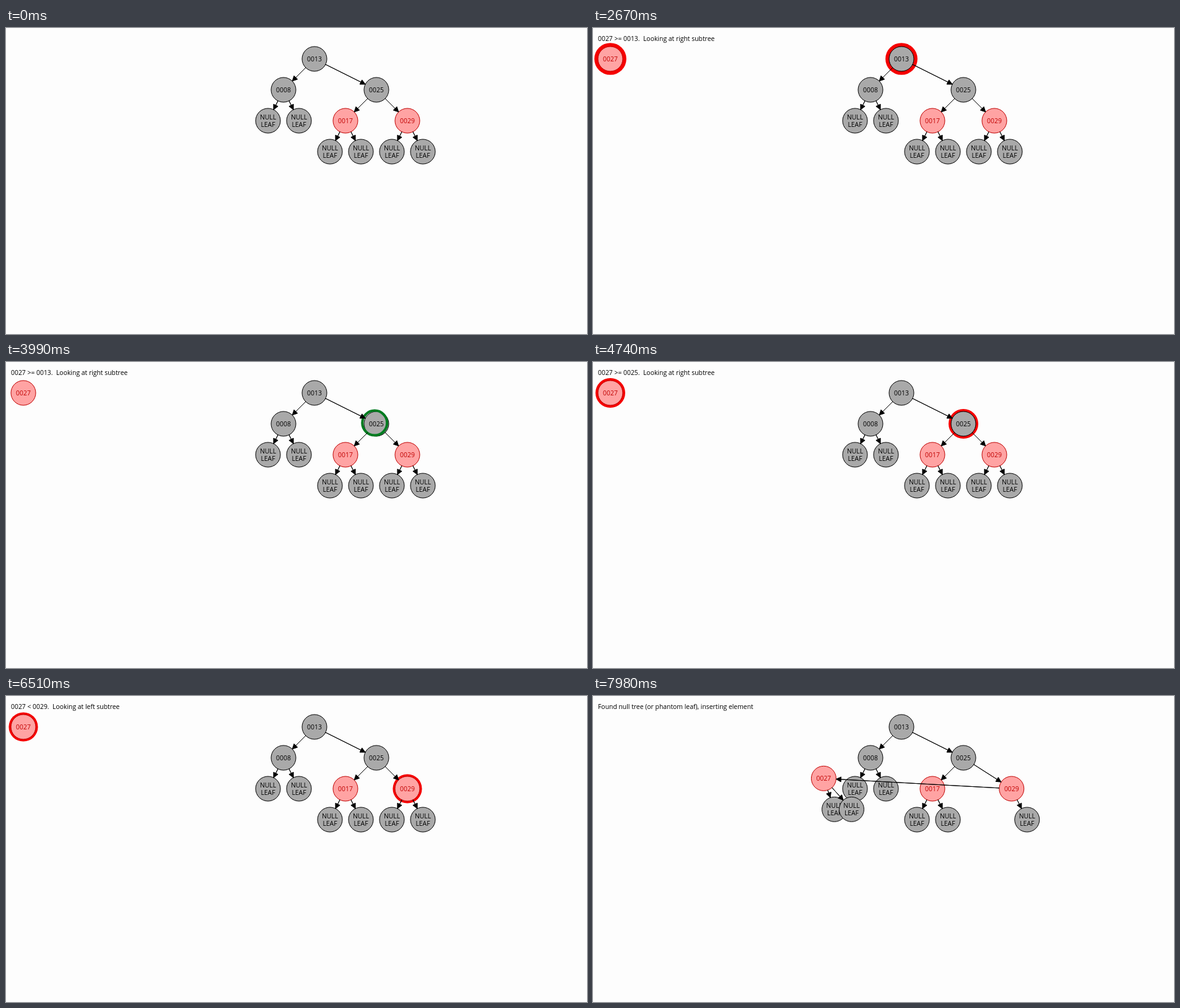
These frames come from a looping animation (938x495 px, 8000 ms). An HTML page:

```html
<!DOCTYPE html>
<html lang="en">
<head>
<meta charset="utf-8">
<title>Red-black tree insertion</title>
<style>
  html, body { margin: 0; width: 100%; height: 100%; overflow: hidden; background: #fdfdfd; }
  svg { display: block; width: 938px; height: 495px; }
  text { font: 10.4px "Open Sans", "Noto Sans", sans-serif; white-space: pre; }
  .node text { text-anchor: middle; }
</style>
</head>
<body>
<svg id="stage" viewBox="0 0 938 495"></svg>
<script>
const stage = document.getElementById('stage');
const LOOP = 8000, TICK = 30, STEPS = 36, R = 20;
const BLACK = { fill: '#a9a9a9', ink: '#000' };
const RED = { fill: '#ffa3a3', ink: '#c00000' };

// Start of each phase in ms
const T = { insert: 750, root: 1830, toRight: 2940, second: 4050, toThird: 5130, third: 6240, attach: 7380 };

const tick = t => Math.floor(t / TICK);
const progress = (t, start) => Math.min(1, Math.max(0, (tick(t) - tick(start)) / STEPS));
const mix = (a, b, p) => a + (b - a) * p;
const between = (t, a, b) => t >= a && t < b;

// Width of the pulsing halo: a triangle wave from 3 to 7
function halo(t) {
  const phase = (((tick(t) - tick(6630)) % 56) + 56) % 56;
  return 3 + Math.min(phase, 56 - phase) / 7;
}

function message(t) {
  if (t < T.insert) return '';
  if (t < T.root) return ' Inserting 0027';
  if (t < T.second) return '0027 &gt;= 0013.  Looking at right subtree';
  if (t < T.third) return '0027 &gt;= 0025.  Looking at right subtree';
  if (t < T.attach) return '0027 &lt; 0029.  Looking at left subtree';
  return 'Found null tree (or phantom leaf), inserting element';
}

const node = (x, y, label, style = BLACK, lit = false) => ({ x, y, label, style, lit });
const leaf = (x, y) => node(x, y, 'NULL LEAF');

function drawNode(n, glow) {
  const lines = n.label.split(' ');
  const base = n.y + 4 - (lines.length - 1) * 6;
  const disc = (r, attrs) => `<circle cx="${n.x}" cy="${n.y}" r="${r}" ${attrs}/>`;
  return '<g class="node">' +
    (n.lit ? disc(R + glow, 'fill="#f50000"') : '') +
    disc(R, `fill="${n.style.fill}" stroke="${n.style.ink}"`) +
    lines.map((s, i) => `<text x="${n.x}" y="${base + i * 12}" fill="${n.style.ink}">${s}</text>`).join('') +
    '</g>';
}

function drawEdge([a, b]) {
  const len = Math.hypot(b.x - a.x, b.y - a.y);
  const ux = (b.x - a.x) / len, uy = (b.y - a.y) / len;
  const x = b.x - ux * R, y = b.y - uy * R;
  const bx = x - ux * 8, by = y - uy * 8;
  return `<path stroke="#000" d="M${a.x + ux * R} ${a.y + uy * R}L${x} ${y}` +
    `L${bx - uy * 4} ${by + ux * 4}L${bx + uy * 4} ${by - ux * 4}L${x} ${y}Z"/>`;
}

function drawRing(t, start, end, from, to) {
  if (!between(t, start, end)) return '';
  const p = progress(t, start);
  return `<circle cx="${mix(from.x, to.x, p)}" cy="${mix(from.y, to.y, p)}" r="${R}" ` +
    'fill="none" stroke="#007b20" stroke-width="4"/>';
}

function draw(t) {
  const p = progress(t, T.attach);
  const attached = t >= T.attach;
  const onRoot = between(t, T.root, T.toRight);
  const onSecond = between(t, T.second, T.toThird);
  const onThird = between(t, T.third, T.attach);

  const n13 = node(498, 50, '0013', BLACK, onRoot);
  const n8 = node(448, 100, '0008');
  const n25 = node(598, 100, '0025', BLACK, onSecond);
  const n17 = node(548, 150, '0017', RED);
  const n29 = node(mix(648, 698, p), 150, '0029', RED, onThird);
  const n27 = node(mix(28, 648, p), mix(50, 200, p), '0027', RED, onRoot || onSecond || onThird);

  const nodes = [n13, n8, n25, n17, n29];
  const edges = [[n13, n8], [n13, n25], [n25, n17], [n25, n29]];
  const addLeaf = (parent, x, y) => {
    const n = leaf(x, y);
    nodes.push(n);
    edges.push([parent, n]);
  };

  addLeaf(n8, 423, 150);
  addLeaf(n8, 473, 150);
  addLeaf(n17, 523, 200);
  addLeaf(n17, 573, 200);
  if (!attached) addLeaf(n29, 623, 200);
  addLeaf(n29, n29.x + 25, 200);
  if (t >= T.insert) nodes.push(n27);
  if (attached) {
    edges.push([n29, n27]);
    for (const x of [623, 673]) addLeaf(n27, mix(98, x, p), mix(100, 250, p));
  }

  const glow = halo(t);
  nodes.sort((a, b) => a.lit - b.lit);
  stage.innerHTML =
    nodes.map(n => drawNode(n, glow)).join('') +
    drawRing(t, T.toRight, T.second, n13, n25) +
    drawRing(t, T.toThird, T.third, n25, n29) +
    edges.map(drawEdge).join('') +
    `<text x="8" y="21">${message(t)}</text>`;
}

const begin = performance.now();
function frame() {
  draw((performance.now() - begin) % LOOP);
  requestAnimationFrame(frame);
}
frame();
</script>
</body>
</html>
```
